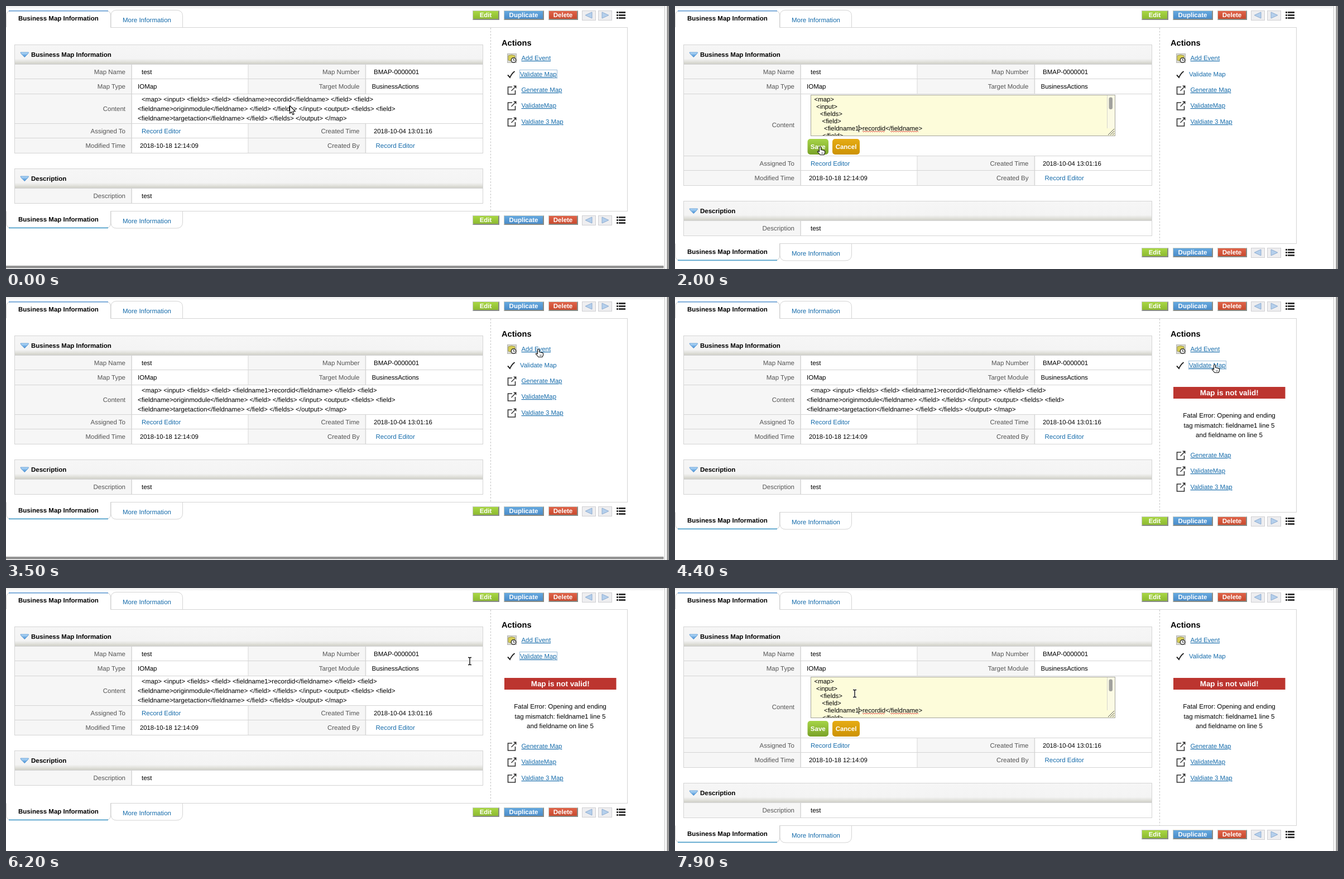
Animation of 1188x471 px, one loop 8000 ms. Source, as an HTML page:

```html
<!DOCTYPE html>
<html lang="en">
<head>
<meta charset="utf-8">
<title>Business Map</title>
<style>
html, body { margin: 0; width: 100%; height: 100%; overflow: hidden; background: #fff; }
svg { display: block; width: 1188px; height: 471px; }
text { font: 11.5px "Liberation Sans", Arial, sans-serif; text-rendering: geometricPrecision; white-space: pre; }
.b { font-weight: bold; }
.lab { fill: #555; text-anchor: end; }
.link { fill: #166cab; }
.act { fill: #166cab; font-size: 11.4px; }
.u { text-decoration: underline 1px; text-underline-offset: 1px; }
.btn { fill: #fff; font-weight: bold; text-anchor: middle; }
.date { font-size: 11.3px; }
.xml { font-size: 11.6px; }
.area { font-size: 11.4px; }
.mid { text-anchor: middle; font-size: 11.6px; }
</style>
</head>
<body>
<svg id="stage" viewBox="0 0 1188 471" xmlns="http://www.w3.org/2000/svg"></svg>
<script>
const LOOP = 8000, LINE = '#d4d4d4';
const esc = s => s.replace(/</g, '&lt;').replace(/>/g, '&gt;');
const text = (x, y, s, cls = '', more = '') => `<text x="${x}" y="${y}" class="${cls}" ${more}>${esc(s)}</text>`;
const rect = (x, y, w, h, fill, more = '') => `<rect x="${x}" y="${y}" width="${w}" height="${h}" fill="${fill}" ${more}/>`;
const path = (d, stroke, more = '') => `<path d="${d}" fill="none" stroke="${stroke}" ${more}/>`;
const group = (id, body, more = '') => `<g id="${id}" ${more}>${body}</g>`;
const grad = (id, ...stops) => `<linearGradient id="${id}" x1="0" y1="0" x2="0" y2="1">` +
  stops.map(([o, c]) => `<stop offset="${o}" stop-color="${c}"/>`).join('') + '</linearGradient>';

const defs = '<defs>' +
  grad('green', [0, '#a9d744'], [1, '#8dba31']) +
  grad('blue', [0, '#66a9df'], [1, '#4a8cc9']) +
  grad('red', [0, '#e0644a'], [1, '#c84a2e']) +
  grad('save', [0, '#a6d447'], [1, '#79a229']) +
  grad('cancel', [0, '#e6ac15'], [1, '#cc9203']) +
  grad('head', [0, '#f6f6f6'], [.72, '#f4f4f4'], [.9, '#deded8'], [1, '#cdcdc4']) +
  grad('tri', [0, '#bfe0fa'], [1, '#3d8ad3']) +
  grad('shade', [0, '#ececec'], [1, '#ffffff']) +
  grad('floor', [0, '#d8d8d8'], [.35, '#858585'], [.65, '#909090'], [1, '#f0f0f0']) +
  '<clipPath id="inner"><rect x="244" y="160" width="530" height="72"/></clipPath></defs>';

// Outset bevel: light top and left, dark bottom and right.
function button(x, y, w, label, fill) {
  return rect(x, y, w, 17, '#c6cbc4') + `<path d="M${x} ${y + 17}h${w}v-17l-2 2v13h${4 - w}z" fill="#878b86"/>` +
    rect(x + 1, y + 1, w - 3, 14, `url(#${fill})`) + text(x + w / 2 - .5, y + 12, label, 'btn');
}

function toolbar(y) {
  const nav = (x, d) => rect(x + .5, y + .5, 24, 17, '#eeeef0', 'stroke="#cfcfd2"') +
    `<path d="${d}" fill="#b4cfec" stroke="#8eacd0"/>`;
  let list = '';
  for (let i = 0; i < 3; i++)
    list += rect(1094, y + 2 + i * 5, 3, 3, '#333') + rect(1098, y + 2 + i * 5, 12, 3, '#333');
  return button(836, y, 48, 'Edit', 'green') + button(892, y, 72, 'Duplicate', 'blue') +
    button(972, y, 53, 'Delete', 'red') +
    nav(1032, `M1050 ${y + 3}v11l-12-5.5z`) + nav(1061, `M1068 ${y + 3}v11l12-5.5z`) + list;
}

function header(y, label) {
  return rect(15.5, y + .5, 839, 34.5, 'url(#head)', `stroke="${LINE}"`) +
    `<path d="M26 ${y + 14}h14.5q0 2-7.2 8.5-7.3-6.5-7.3-8.5z" fill="url(#tri)" stroke="#4b8fd0" stroke-width=".8"/>` +
    text(45, y + 22, label, 'b');
}

const cells = (y, h, double) =>
  rect(15.5, y + .5, 839, h, '#fff', `stroke="${LINE}"`) +
  rect(16, y + 1, 209, h - 1, '#f6f6f6') + rect(224.3, y + 1, 1.6, h - 1, '#d8d8d8') +
  (double ? rect(434, y + 1, 210, h - 1, '#f6f6f6') + rect(433.5, y + 1, 1, h - 1, '#d8d8d8') +
    rect(643.6, y + 1, 1.6, h - 1, '#d8d8d8') : '');

function row(y, h, a, b, c, d) {
  const [x1, v1, k1 = ''] = b, [x2, v2, k2 = ''] = d;
  return cells(y, h, true) + text(214, y + 18, a, 'lab') + text(x1, y + 18, v1, k1) +
    text(633.5, y + 18, c, 'lab') + text(x2, y + 18, v2, k2);
}

const external = y => path(`M907 ${y + 3}h-7.5v13h13v-7`, '#333', 'stroke-width="1.6"') +
  path(`M905.5 ${y + 10}l6.5-6.5`, '#333', 'stroke-width="1.4"') +
  `<path d="M909 ${y + .5}h5.5v5.5z" fill="#333"/>`;

const eventIcon = rect(898.5, 85.5, 16, 16, '#d9d9d3', 'stroke="#b5b5b0"') +
  '<path d="M900 89q6-3 12 0v8q-6 3-12 0z" fill="#d8cf57" stroke="#8f8a45" stroke-width=".8"/>' +
  '<circle cx="909.5" cy="97" r="4.3" fill="#f2f2f2" stroke="#333" stroke-width="1.4"/>' +
  path('M909.5 94.5v2.7h2.3', '#333');

const owner = 'Record Editor';

const upper =
  rect(0, 0, 1180, 6, 'url(#shade)') +
  path('M187.5 38.5H1113.5', LINE) +
  path('M188 38.5V16Q189 7.5 198 7.5H305Q316.5 7.5 316.5 18V38', LINE) +
  path('M.5 38V17Q1 8.5 9 8.5H179Q187.5 8.5 187.5 17V38.5', '#cfcfcf') +
  path('M5 8.8H183', '#5793cf', 'stroke-width="1.6"') +
  text(22, 26, 'Business Map Information', 'b') + text(209, 29, 'More Information', 'link') + toolbar(8) +
  header(69, 'Business Map Information') +
  row(104, 26, 'Map Name', [243, 'test'], 'Map Number', [659, 'BMAP-0000001']) +
  row(130, 27, 'Map Type', [236, 'IOMap'], 'Target Module', [655.5, 'BusinessActions']);

const view = cells(157, 53) + text(214, 188, 'Content', 'lab') +
  '<text id="line1" x="243" y="171" class="xml"></text>' +
  text(236, 188, '<fieldname>originmodule</fieldname> </field> </fields> </input> <output> <fields> <field>', 'xml') +
  text(236, 205, '<fieldname>targetaction</fieldname> </field> </fields> </output> </map>', 'xml');

const form = cells(157, 111) + text(214, 217, 'Content', 'lab') +
  rect(243.5, 159.5, 545, 73, '#fff', 'id="area" stroke="#a3a39b"') +
  '<g clip-path="url(#inner)">' +
  text(249.5, 171, '<map>', 'area') + text(253, 184, '<input>', 'area') + text(260, 197, '<fields>', 'area') +
  text(263.5, 210, '<field>', 'area') + '<text id="tag" x="267" y="223" class="area"></text>' +
  text(264, 236, '</field>', 'area') + '</g>' +
  path('', '#d8322c', 'id="wave" stroke-width=".9"') +
  path('', '#000', 'id="caret"') +
  rect(774, 160, 14, 59, '#fafaf0', 'fill-opacity=".5"') + path('M774.5 160V219', '#d6d6cc') +
  rect(777.5, 163.5, 6.5, 21.5, '#a2a29e', 'rx="3"') +
  path('M776 231l11-11M780 231l7-7M784 231l3-3', '#555') +
  rect(237.5, 238, 37.5, 28, 'url(#save)', 'rx="5"') + text(256.3, 256, 'Save', 'btn', 'id="save-label"') +
  rect(282, 238, 49, 28, 'url(#cancel)', 'rx="5"') + text(306.5, 256, 'Cancel', 'btn');

const lower =
  row(210, 27, 'Assigned To', [243, owner, 'link'], 'Created Time', [659, '2018-10-04 13:01:16', 'date']) +
  row(236, 27, 'Modified Time', [240, '2018-10-18 12:14:09', 'date'], 'Created By', [662.5, owner, 'link']) +
  header(291, 'Description') + cells(326, 27) + text(214, 344, 'Description', 'lab') + text(243, 344, 'test');

const foot =
  path('M187.5 367.5H1113.5', LINE) +
  path('M188 367V389Q189 398 198 398H305Q316.5 398 316.5 387V367.5', LINE) +
  path('M.5 367.5V389Q1 397.5 9 397.5H179Q187.5 397.5 187.5 389V367.5', '#cfcfcf') +
  path('M5 397.4H183', '#4f9fc9', 'stroke-width="1.6"') +
  text(22, 386, 'Business Map Information', 'b') + text(209, 389, 'More Information', 'link') + toolbar(375) +
  rect(0, 464.5, 1178.5, 6, 'url(#floor)');

const side =
  path('', '#c4c4c4', 'id="divider" stroke-dasharray="3 2.5"') + path('', LINE, 'id="edge"') +
  text(888, 71, 'Actions', 'b', 'style="font-size:14.6px"') +
  eventIcon + text(923.5, 97, 'Add Event', 'act u') +
  path('M899 123.5l4 4.5q3-7 8.5-11', '#222', 'stroke-width="1.9"') +
  text(921, 126, 'Validate Map', 'act', 'id="validate"') +
  rect(920.5, 114.5, 67, 15, 'none', 'id="focus" stroke="#3b7fb5" stroke-dasharray="1 1"') +
  group('error', rect(893, 161, 200.5, 21, '#bc352f') +
    text(993.2, 176, 'Map is not valid!', 'btn', 'style="font-size:13.4px"') +
    text(993, 216, 'Fatal Error: Opening and ending', 'mid') +
    text(993, 234, 'tag mismatch: fieldname1 line 5', 'mid') +
    text(993, 251, 'and fieldname on line 5', 'mid')) +
  group('more', [['Generate Map', 154], ['ValidateMap', 182], ['Valdiate 3 Map', 211]]
    .map(([s, y]) => external(y - 12) + text(923.5, y, s, 'act u')).join(''));

const frameEdge = rect(1180, 0, 1, 471, '#bdbdbd') + rect(1184, 0, 4, 471, '#9c9c9c');

const ink = 'fill="#fff" stroke="#111" stroke-width="1.1" stroke-linejoin="round"';
const bar = 'M-3-6.5H-1Q0-6.5 0-5.5Q0-6.5 1-6.5H3M0-6V6M-3 6.5H-1Q0 6.5 0 5.5Q0 6.5 1 6.5H3';
const pointers =
  group('arrow', `<path d="M.5.5V14.5L3.6 11.7 5.9 16.8 8.1 15.8 5.9 10.8H10.5Z" ${ink}/>`) +
  group('beam', path(bar, '#fff', 'stroke-width="3"') + path(bar, '#111', 'stroke-width="1.4"')) +
  group('hand', `<path d="M-1.5 8V.5Q-1.5-.8 0-.8T1.5.5V4.5L4 5 6.5 5.6 8.5 6.5 8.6 10 7 13.5H0L-2.5 10.5-4.6 8.2Q-4.5 6.5-3 7Z" ${ink}/>` +
    path('M3 9.5v2M5 9.5v2', '#111', 'stroke-width=".9"'));

const stage = document.getElementById('stage');
stage.innerHTML = defs + upper + group('view', view) + group('form', form) + group('lower', lower) +
  group('foot', foot) + side + frameEdge + pointers;
const $ = id => document.getElementById(id);

// Page state: each entry changes only what it names. link: 0 plain, 1 hovered, 2 focused.
const STEPS = [
  [0, { edit: 0, err: 0, live: 0, spell: 0, caret: 0, hover: 0, digit: '', link: 2 }],
  [500, { edit: 1, live: 1, link: 1 }],
  [800, { spell: 1, link: 0 }],
  [900, { caret: 1 }],
  [1500, { digit: '1' }],
  [2300, { hover: 1 }],
  [2500, { live: 0, caret: 0 }],
  [2700, { edit: 0, hover: 0, spell: 0 }],
  [3300, { link: 1 }],
  [3500, { link: 0 }],
  [3900, { link: 1 }],
  [4100, { err: 1, link: 2 }],
  [4700, { err: 0, link: 0 }],
  [5300, { link: 1 }],
  [6000, { err: 1, link: 2 }],
  [7400, { edit: 1, live: 1, link: 0 }],
  [7800, { spell: 1, caret: 1 }]
];

// Pointer runs: shape, then time, x, y triples.
const MOVES = [
  ['arrow', 0, 508, 178],
  ['beam', 300, 513, 183, 800, 400, 205, 900, 326, 217, 1000, 364, 201, 1100, 368, 206, 1200, 371, 212,
    1300, 373, 216, 1400, 374, 219, 1700, 362, 220],
  ['arrow', 1800, 335, 230, 1900, 290, 244],
  ['hand', 2000, 260, 253, 2100, 252, 253],
  ['arrow', 2900, 310, 240, 3000, 470, 212, 3100, 700, 170, 3200, 880, 138],
  ['hand', 3300, 967, 122, 3500, 954, 94, 3700, 958, 102, 3800, 963, 113, 3900, 967, 122],
  ['arrow', 6100, 915, 127],
  ['beam', 6200, 831, 131, 6300, 700, 147, 6400, 530, 170, 6500, 387, 189, 6700, 371, 185, 6800, 355, 179,
    6900, 346, 174, 7100, 333, 171, 7200, 323, 172, 7400, 324, 185, 7500, 326, 200, 7600, 328, 212,
    7800, 326, 203, 7900, 322, 189]
];

const track = MOVES.flatMap(([shape, ...p]) =>
  Array.from({ length: p.length / 3 }, (_, i) => [p[i * 3], shape, p[i * 3 + 1], p[i * 3 + 2]]));

function squiggle(x1, x2) {
  let d = `M${x1} 224`;
  for (let x = x1 + 2, i = 1; x <= x2; x += 2, i++) d += `L${x} ${224 + (i % 2) * 1.6}`;
  return d;
}

const show = (id, on) => { $(id).style.display = on ? '' : 'none'; };
const drop = (id, y) => $(id).setAttribute('transform', `translate(0 ${y})`);

function draw(t) {
  const s = Object.assign({}, ...STEPS.filter(([at]) => at <= t).map(([, change]) => change));
  const sink = s.edit ? 58 : s.err ? 18 : 0;
  const shift = s.digit ? 6 : 0;
  show('view', !s.edit);
  show('form', s.edit);
  show('error', s.err);
  show('focus', s.link === 2);
  show('wave', s.spell);
  show('caret', s.caret);
  drop('lower', s.edit ? 58 : 0);
  drop('foot', sink);
  drop('more', s.err ? 133 : 0);
  $('divider').setAttribute('d', `M868.5 39V${367 + sink}`);
  $('edge').setAttribute('d', `M1113.5 38V${368 + sink}`);
  $('validate').setAttribute('class', s.link ? 'act u' : 'act');
  $('line1').textContent = `<map> <input> <fields> <field> <fieldname${s.digit}>recordid</fieldname> </field> <field>`;
  $('tag').textContent = `<fieldname${s.digit}>recordid</fieldname>`;
  $('area').setAttribute('fill', s.live ? '#fdfcda' : '#fff');
  $('save-label').style.fill = s.hover ? '#174a6b' : '';
  $('wave').setAttribute('d', (s.digit ? '' : squiggle(273, 324)) +
    squiggle(330 + shift, 371 + shift) + squiggle(380 + shift, 431 + shift));
  $('caret').setAttribute('d', `M${323.5 + shift} 213V226`);

  const [, shape, x, y] = track.filter(([at]) => at <= t).pop();
  for (const id of ['arrow', 'beam', 'hand']) show(id, id === shape);
  $(shape).setAttribute('transform', `translate(${x} ${y})`);
}

function tick() {
  draw(performance.now() % LOOP);
  requestAnimationFrame(tick);
}
tick();
</script>
</body>
</html>
```
